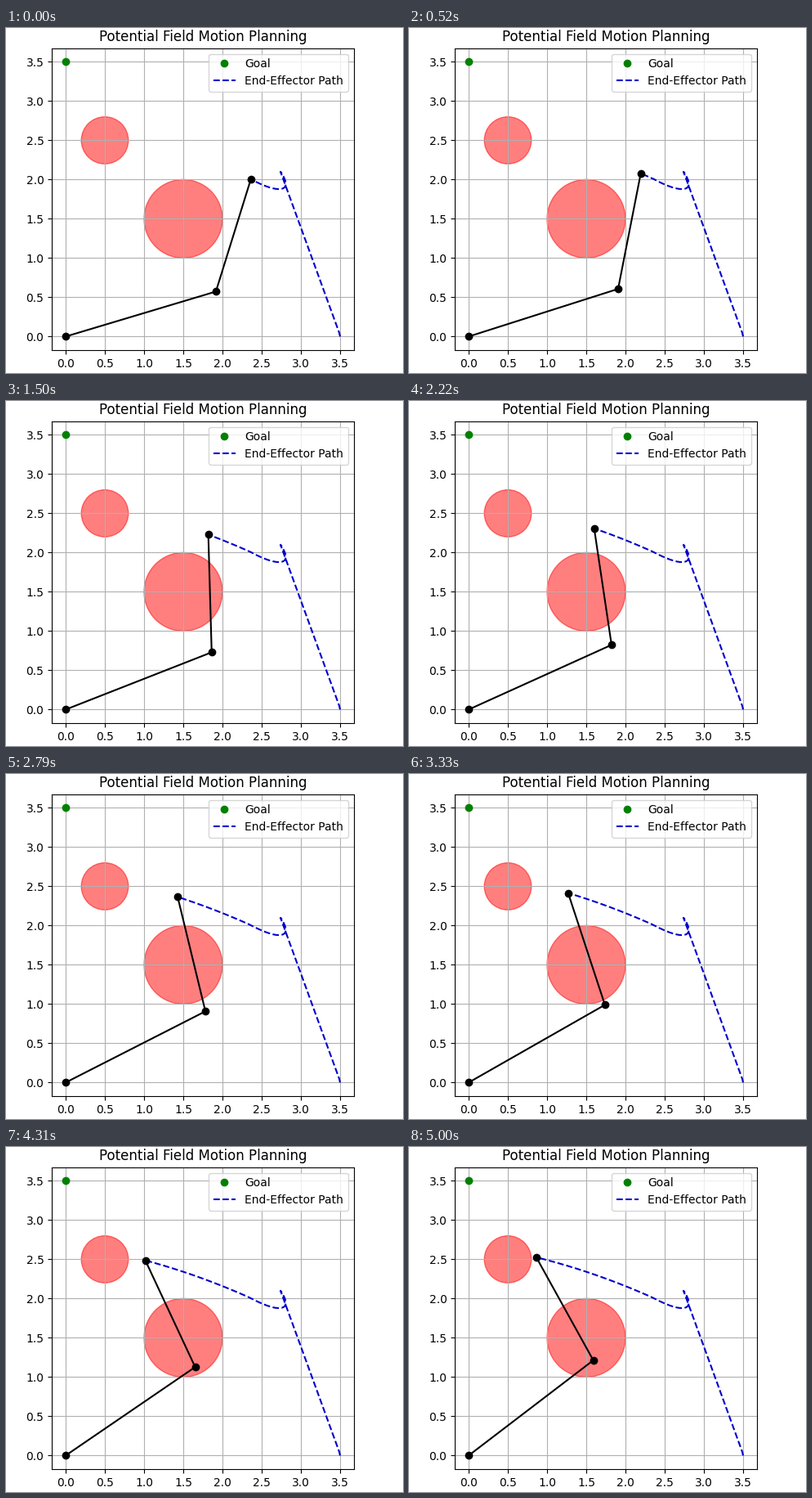
Write a matplotlib script that moves like this. It is 486 px wide and 422 px high and loops after 5020 ms.

```python
import numpy as np
import matplotlib.pyplot as plt
from matplotlib.animation import FuncAnimation

W, H, DPI = 486, 422, 100
FRAMES, STEP = 251, 20  # 5020 ms loop
L1, L2 = 2.0, 1.5

# Horizontal position of the hand at a few moments (seconds)
KEY_T = np.array([0, 1.03, 1.5, 2.22, 3.33, 5.0])
KEY_X = np.array([2.365, 2.013, 1.823, 1.604, 1.269, 0.863])


def hermite(t, kt, kv):
    """Smooth curve through the key values."""
    slope = np.gradient(kv, kt, edge_order=2)
    i = np.clip(np.searchsorted(kt, t, side="right") - 1, 0, len(kt) - 2)
    h = kt[i + 1] - kt[i]
    u = (t - kt[i]) / h
    return ((1 + 2 * u) * (1 - u) ** 2 * kv[i]
            + u * (1 - u) ** 2 * h * slope[i]
            + u * u * (3 - 2 * u) * kv[i + 1]
            + u * u * (u - 1) * h * slope[i + 1])


def bezier(p0, p1, p2, p3, n=30):
    u = np.linspace(0, 1, n)[:, None]
    p0, p1, p2, p3 = map(np.array, (p0, p1, p2, p3))
    return ((1 - u) ** 3 * p0 + 3 * u * (1 - u) ** 2 * p1
            + 3 * u * u * (1 - u) * p2 + u ** 3 * p3)


def find_elbow(x, y):
    """Two-link inverse kinematics, elbow on the lower side."""
    d = np.hypot(x, y)
    a = np.arctan2(y, x) - np.arccos((L1**2 + d**2 - L2**2) / (2 * L1 * d))
    return L1 * np.column_stack([np.cos(a), np.sin(a)])


times = np.minimum((np.arange(FRAMES) + 0.5) * STEP / 1000, KEY_T[-1])
x = hermite(times, KEY_T, KEY_X)
y = 2.688 - 0.130 * x - 0.0673 * x**2
hand = np.column_stack([x, y])
elbow = find_elbow(x, y)

# Path travelled before the loop begins: a straight run, then a hook
hook = bezier((2.74, 2.10), (2.92, 1.84), (2.72, 1.81), (2.365, 2.004))
past = np.vstack([[(3.5, 0), (3.49, 0.045)], hook])
track = np.vstack([past, hand])

plt.rcParams["font.family"] = "DejaVu Sans"
fig = plt.figure(figsize=(W / DPI, H / DPI), dpi=DPI)
side = 369.6
ax = fig.add_axes([56.2 / W, 27.8 / H, side / W, side / H])
ticks = np.arange(0, 3.6, 0.5)
ax.set(xlim=(-0.175, 3.675), ylim=(-0.175, 3.675), xticks=ticks, yticks=ticks)
ax.set_title("Potential Field Motion Planning")
ax.grid(True)

for center, radius in [((1.5, 1.5), 0.5), ((0.5, 2.5), 0.3)]:
    ax.add_patch(plt.Circle(center, radius, color="red", alpha=0.5))

ax.plot(0, 3.5, "o", color="green", label="Goal")
trail, = ax.plot([], [], "--", color="mediumblue", label="End-Effector Path")
arm, = ax.plot([], [], "ko-")
ax.legend(loc="upper right")


def update(i):
    trail.set_data(*track[:len(past) + i + 1].T)
    arm.set_data(*np.array([(0, 0), elbow[i], hand[i]]).T)
    return trail, arm


anim = FuncAnimation(fig, update, frames=FRAMES, interval=STEP,
                     repeat=True, repeat_delay=0)
plt.show()
```
